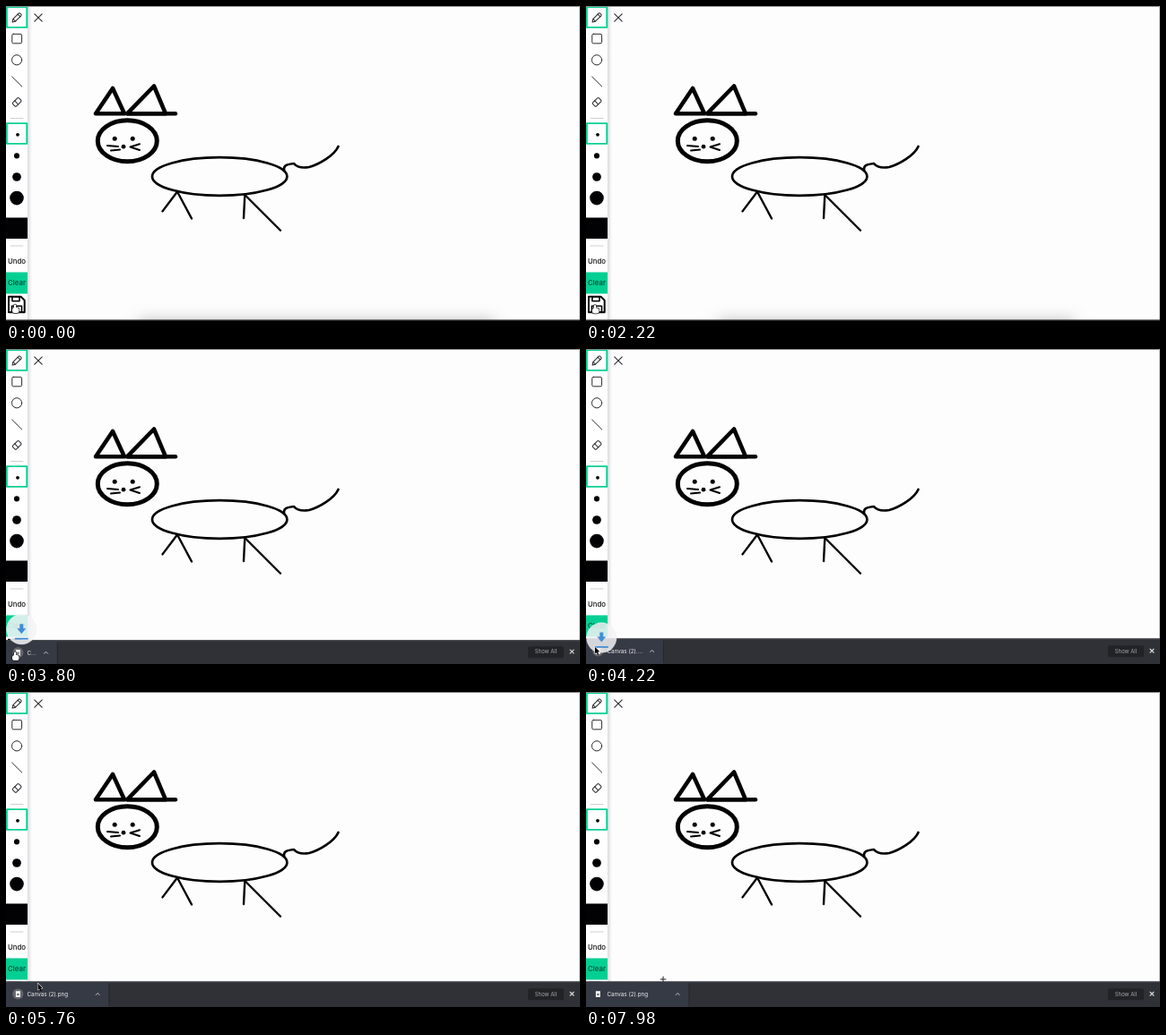
Write an HTML page with a canvas that moves like this. It is 640 px wide and 352 px high and loops after 8 s.

```html
<!DOCTYPE html>
<html lang="en">
<head>
<meta charset="utf-8">
<title>Sketch pad</title>
<style>
html, body { margin: 0; width: 100%; height: 100%; overflow: hidden; background: #fdfdfd; }
canvas { display: block; width: 640px; height: 352px; }
</style>
</head>
<body>
<canvas id="stage" width="640" height="352"></canvas>
<script>
const ctx = document.getElementById('stage').getContext('2d');
const W = 640, H = 352, LOOP = 8000;
const PAPER = '#fdfdfd', INK = '#020204', GREEN = '#04cf93', ICON = '#2b2b2e';
const SHELF = '#2f3136', CHIP = '#363a45', BLUE = '#3a87d4';
const ROW = 23.6;

const span = (t, a, b) => Math.max(0, Math.min(1, (t - a) / (b - a)));
const smooth = k => k * k * (3 - 2 * k);
const easeOut = k => 1 - (1 - k) ** 2;

function box(x, y, w, h, color) {
  ctx.fillStyle = color;
  ctx.fillRect(x, y, w, h);
}

function stroke(width, color = INK) {
  ctx.lineWidth = width;
  ctx.strokeStyle = color;
  ctx.stroke();
}

function fill(color = INK) {
  ctx.fillStyle = color;
  ctx.fill();
}

function poly(...pts) {
  ctx.beginPath();
  for (let i = 0; i < pts.length; i += 2) ctx.lineTo(pts[i], pts[i + 1]);
}

function line(width, color, ...pts) {
  poly(...pts);
  stroke(width, color);
}

function oval(x, y, rx, ry = rx) {
  ctx.beginPath();
  ctx.ellipse(x, y, rx, ry, 0, 0, Math.PI * 2);
}

function dot(x, y, r, color) {
  oval(x, y, r);
  fill(color);
}

function round(x, y, w, h, r) {
  ctx.beginPath();
  ctx.roundRect(x, y, w, h, r);
}

function label(str, x, y, size, color, align = 'center', weight = 400) {
  ctx.font = `${weight} ${size}px Inter, sans-serif`;
  ctx.textAlign = align;
  ctx.fillStyle = color;
  ctx.fillText(str, x, y);
}

function cross(x, y, r, color) {
  for (const s of [-1, 1]) line(1.1, color, x - r, y - s * r, x + r, y + s * r);
}

// runs paint with the origin at x, y
function at(x, y, paint, angle = 0) {
  ctx.save();
  ctx.translate(x, y);
  ctx.rotate(angle);
  paint();
  ctx.restore();
}

function paper() {
  box(0, 0, W, H, PAPER);
  ctx.save();
  ctx.shadowColor = 'rgba(0,0,0,.28)';
  ctx.shadowBlur = 16;
  box(148, H - 1, 396, 10, PAPER);
  ctx.restore();
  const edge = ctx.createLinearGradient(24, 0, 29, 0);
  edge.addColorStop(0, '#dcdce0');
  edge.addColorStop(1, PAPER);
  box(24, 0, 5, H, edge);
}

function windowEdge() {
  box(0, 0, W, 1, '#8a8a8c');
  box(W - 1, 0, 1, H, '#b4b4b6');
  box(0, H - 1.5, W, 1.5, '#29292c');
}

function ear(left, tip, top, right) {
  poly(left, 120.3, tip, top, right, 120.3);
  ctx.closePath();
  stroke(4.6);
}

function legs(x, y, reach, ...feet) {
  for (const foot of feet) line(2.4, INK, x, y, foot, y + reach(foot - x));
}

function cat() {
  ear(100, 119, 92, 132);
  ear(135, 165, 89.5, 178);
  line(4.4, INK, 135, 120.3, 189, 120.3);
  oval(135.3, 150.8, 33, 23);
  stroke(5);
  for (const x of [121.2, 141.2]) dot(x, 148.2, 2.5);
  dot(131, 157.2, 2.4);
  line(2, INK, 113, 156, 125, 157);
  line(2, INK, 117, 161.5, 127, 160.5);
  line(2, INK, 149, 154.3, 138.5, 157.5, 149, 161);
  oval(238.2, 190.5, 75.2, 21.3);
  stroke(2.7);
  legs(191, 207.5, dx => 26 + dx / 4, 174.5, 207);
  legs(266.3, 211, dx => 26.5 + dx / 3, 265, 306);
  ctx.beginPath();
  ctx.moveTo(310, 184);
  ctx.bezierCurveTo(309, 177, 314, 177, 321, 176);
  ctx.bezierCurveTo(325, 181, 332, 181, 338, 180);
  ctx.bezierCurveTo(349, 177, 366, 167, 370.5, 157);
  stroke(2.7);
}

function pencil() {
  round(-1.9, -6, 3.8, 10, 1);
  stroke(1, ICON);
  line(1, ICON, -1.9, 4, 0, 7, 1.9, 4);
  line(1, ICON, -1.9, -3.5, 1.9, -3.5);
}

function eraser() {
  round(-2.8, -5, 5.6, 9.5, 1.2);
  stroke(1, ICON);
  line(1, ICON, -2.8, 0.5, 2.8, 0.5);
}

function disk() {
  poly(-9, -9, 4.5, -9, 8.7, -4.8, 8.7, 8.5, -9, 8.5);
  ctx.closePath();
  stroke(2);
  ctx.beginPath();
  ctx.rect(-5, -9, 8, 5);
  ctx.rect(-5.5, 1.5, 11, 7);
  stroke(1.6);
}

function frameTool(y) {
  ctx.beginPath();
  ctx.rect(0.9, y - 11.4, 22.4, 22.8);
  stroke(1.9, GREEN);
}

function toolbar() {
  box(0, 0, 24, H, '#fff');
  frameTool(12.5);
  frameTool(142.5);
  at(12, 13, pencil, Math.PI / 4);
  round(6.8, 31.3, 10.8, 10.5, 1.5);
  stroke(1, ICON);
  oval(12.1, 60.3, 5.6);
  stroke(1, ICON);
  line(1, ICON, 6.7, 79, 17.7, 90);
  at(12, 107.5, eraser, Math.PI / 4);
  for (const y of [125.5, 268]) line(1, '#cfcfd2', 5, y, 19, y);
  for (let i = 0; i < 4; i++) dot(i ? 12 : 13, 143.8 + ROW * i, 1.9 * 1.6 ** i);
  box(0, 236.5, 24, 23.5, INK);
  label('Undo', 12, 288.4, 7.8, '#111', 'center', 500);
  box(0, 297.5, 24, 24, GREEN);
  label('Clear', 12, 312.3, 7.8, '#054536', 'center', 500);
  at(12, 333.7, disk);
  cross(36, 13, 4.2, ICON);
}

function fitted(name, room) {
  const wide = s => ctx.measureText(s).width > room;
  ctx.font = '6.3px Inter, sans-serif';
  if (!wide(name)) return name;
  while (name && wide(name + '...')) name = name.slice(0, -1);
  return name && name + '...';
}

function chip(t, top) {
  const w = 114.5 * easeOut(span(t, 3220, 5220)), y = top + 14;
  ctx.save();
  ctx.beginPath();
  ctx.rect(0, top + 1, w, 28);
  ctx.clip();
  box(0, top + 1, w, 28, CHIP);
  if (t < 7300) dot(13.3, y, 6, '#65676c');
  box(10.9, y - 3.3, 5, 6.8, '#f4f4f4');
  box(12.2, y - 0.5, 2.4, 2, '#6c6e74');
  label(fitted('Canvas (2).png', w - 45), 23.5, y + 2.3, 6.3, '#ededee', 'left');
  line(1, '#c6c7ca', w - 14.3, y + 1, w - 12.3, y - 1, w - 10.3, y + 1);
  ctx.restore();
  box(w, top + 3, 1, 24, '#26282c');
}

function shelf(t) {
  const open = span(t, 3220, 3840);
  if (!open) return;
  const top = H - 28.5 * open, mid = (top + H) / 2;
  box(0, top, W, H - top, SHELF);
  box(0, top, W, 1, '#494b50');
  round(582, mid - 6.5, 40, 13, 2);
  fill('#222327');
  label('Show All', 602, mid + 1.8, 6, '#a6a7a9');
  cross(631, mid - 0.5, 2, '#d8d8da');
  chip(t, top);
}

function badge(t) {
  const k = span(t, 3200, 4780);
  ctx.globalAlpha = 1 - 4 * (k - 0.5) ** 2;
  at(17.3, 300 + 35 * k, () => {
    dot(0, 0, 17, 'rgba(243,244,246,.92)');
    box(-2, -6, 4, 6, BLUE);
    poly(-5, -1, 5, -1, 0, 5);
    fill(BLUE);
    box(-7.5, 9.5, 15, 1.8, BLUE);
  });
  ctx.globalAlpha = 1;
}

function hand() {
  round(-3, 3, 7.5, 6, 2.5);
  ctx.roundRect(-1, -0.5, 2.2, 6, 1);
  stroke(1.4, '#1b1b1d');
  fill('#fff');
}

function arrow() {
  poly(0, 0, 0, 7, 5, 5);
  ctx.closePath();
  stroke(1.2, '#e6e6e8');
  line(1.4, INK, 2, 5, 3.3, 7.8);
  poly(0, 0, 0, 7, 5, 5);
  fill();
}

function plus() {
  line(1, '#27272a', -3, 0, 3, 0);
  line(1, '#27272a', 0, -3, 0, 3);
}

function pointer(t) {
  if (t < 3840) return at(10, 334 + 5 * smooth(span(t, 1960, 3200)), hand);
  if (t > 7400) return at(86, 321, plus);
  const k = smooth(span(t, 4780, 7300));
  at(10 + 76 * k, 324 + 4 * k + 9 * (1 - k) ** 8, arrow);
}

function draw(t) {
  ctx.lineCap = ctx.lineJoin = 'round';
  paper();
  toolbar();
  cat();
  windowEdge();
  shelf(t);
  badge(t);
  pointer(t);
}

const start = performance.now();
function tick() {
  draw((performance.now() - start) % LOOP);
  requestAnimationFrame(tick);
}
tick();
</script>
</body>
</html>
```
